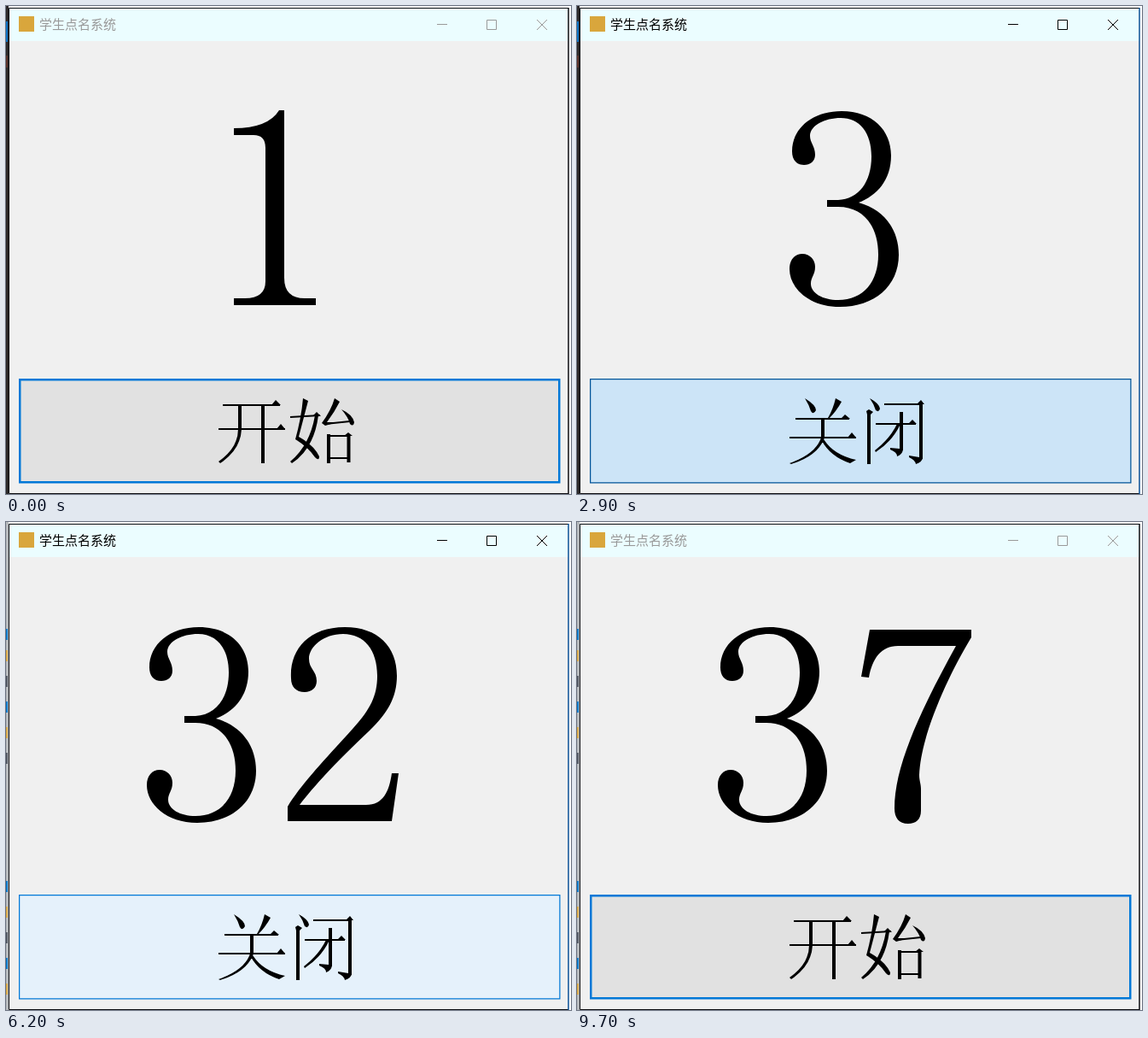
An HTML page that plays this animation: 662x571 px, repeating every 9900 ms.

```html
<!DOCTYPE html>
<html lang="zh-CN">
<head>
<meta charset="utf-8">
<title>学生点名系统</title>
<style>
  html, body { margin: 0; width: 100%; height: 100%; overflow: hidden; background: #fff; }
  svg { display: block; }
  #caption { font: 15px "Noto Sans CJK SC", "Noto Sans CJK", sans-serif; }
  .line { fill: none; }
  .thin { fill: none; stroke: #000; stroke-width: 2; }
  .thick { fill: none; stroke: #000; stroke-width: 4; }
</style>
</head>
<body>
<svg width="662" height="571" viewBox="0 0 662 571">
  <defs>
    <!-- Song-style numerals, drawn in a cell from x=230 to x=398 -->
    <path id="d1" d="M320 122H326V318Q326 342 350 342H363V350H267V342H280Q304 342 304 322V166Q304 151 290 151H267V143Q307 143 320 122Z"/>
    <path id="d2" d="M250 183C248 150 270 123 313 123C352 123 374 146 374 180C374 205 363 224 342 244C311 273 279 306 260 331H338C358 331 365 315 368 294H376L368 350H246V333C262 306 297 270 323 241C343 219 351 203 351 180C351 150 336 131 311 131C288 131 271 146 271 160C271 172 280 174 280 186C280 194 274 199 266 199C256 199 250 193 250 183Z"/>
    <path id="d3" d="M252 170C252 143 276 123 310 123C346 123 368 145 368 175C368 204 351 222 330 230C360 238 377 262 377 291C377 328 348 352 308 352C272 352 249 330 249 308C249 297 255 290 264 290C273 290 279 297 279 305C279 315 274 317 274 325C274 336 288 344 306 344C336 344 353 322 353 291C353 258 336 235 306 235H293V227H306C330 226 345 206 345 176C345 148 331 131 309 131C290 131 273 140 273 152C273 160 279 164 279 174C279 182 273 186 266 186C257 186 252 180 252 170Z"/>
    <path id="d4" fill-rule="evenodd" d="M334 123H344V275H378V284H344V325Q344 342 362 342H374V350H292V342H305Q322 342 322 325V284H241V275ZM322 149L251 275H322Z"/>
    <path id="d7" d="M259 126H378V135C352 178 319 248 317 296C317 303 319 306 319 312V338C319 348 313 353 304 353C293 353 288 346 288 335C288 290 312 232 360 145H292C272 145 262 160 258 182L249 181Z"/>
  </defs>

  <rect id="strip" width="3" height="571"/>
  <g id="specksA">
    <rect y="18" width="2" height="24" fill="#0a6fc2"/>
    <rect y="58" width="2" height="14" fill="#5a3028"/>
  </g>
  <g id="specksB"></g>

  <rect x="3" y="2" width="656" height="569" fill="#f0f0f0"/>
  <rect x="3" y="2" width="656" height="39" fill="#ebfdff"/>
  <path class="line" stroke="#0b0b0f" d="M659 2.5H3.5V570.5H659"/>
  <path id="edge" class="line" stroke-width="1.5" d="M659 2V571"/>
  <rect x="15" y="12" width="18" height="18" fill="#d9a63c"/>
  <text id="caption" x="39" y="27">学生点名系统</text>
  <path id="controls" class="line" d="M505 21.5H517M563.5 16.5H574.5V27.5H563.5ZM622 16L634 28M634 16L622 28"/>

  <g id="digits"></g>

  <rect id="button"/>
  <g id="start" role="img" aria-label="开始">
    <path class="thin" d="M254 467H321M249 495H327M333 481L368 479M374 489L403 486M378 503H402M378 529H402"/>
    <path class="thick" d="M301 467V535M378 501V535M401.5 503V534"/>
    <path d="M311 467L316 461L322 467ZM317 495L322 489L327 495ZM359 480L364 475L369 480ZM396 503L401 499L406 503Z
      M272 467H276V495Q275 519 251 535L249 533Q272 517 272 495Z
      M348 459L354 462L343 504Q361 514 367 527Q367 533 362 528Q354 516 339 507Q346 482 348 459Z
      M362 479H366Q361 518 335 535L333 533Q356 514 362 479Z
      M385 459L391 463Q385 475 376 487L388 487L374 491L370 488Q381 473 385 459Z
      M393 472Q406 478 408 487Q407 493 403 489Q401 481 393 472Z"/>
  </g>
  <g id="stop" role="img" aria-label="关闭">
    <path class="thin" d="M256 483H319M249 505H327M360 466H403M350 489H397"/>
    <path class="thick" d="M342 474V536M403 466V530M380 475V520"/>
    <path d="M309 483L314 478L320 483ZM317 505L322 499L327 505ZM398 466L403 461L407 466ZM388 489L393 484L398 489Z
      M267 459Q280 467 280 473Q277 479 274 474Q272 467 267 459Z
      M303 459L310 463Q304 474 295 483L294 482Q300 472 303 459Z
      M286 483H290V505Q283 526 251 536L249 535Q280 524 286 505Z
      M288 505Q299 525 327 531L320 535Q296 527 286 507Z
      M343 459Q354 465 355 471Q354 476 350 473Q348 466 343 459Z
      M339 474L342 472L347 475L344 478H340Z
      M405 529Q404 534 397 536Q396 531 389 528V526L401 528Z
      M382 519Q381 525 375 527Q375 522 367 519V517L378 518Z
      M375 489H379Q370 509 350 522L349 520Q367 506 375 489Z"/>
  </g>
</svg>
<script>
const LOOP = 9900, STEP = 100, CELL = 168;
const el = id => document.getElementById(id);

const rolls = [
  { from: 1600, values: [3, 1, 4, 2, 3, 1, 4, 2, 4, 2, 1, 1, 1, 3, 2, 1] },
  { from: 6000, values: [24, 13, 32, 4, 21, 14, 33, 2, 7, 23, 12, 31, 34, 17, 37] }
];
const buttonTimes = [
  [0, 'focus'], [700, 'hover'], [1400, 'press'], [1600, 'hover'],
  [2900, 'press'], [3100, 'hover'], [3600, 'focus'], [5400, 'hover'],
  [5800, 'press'], [6000, 'hover'], [7200, 'press'], [7400, 'hover'], [7800, 'focus']
];
const activeTimes = [[0, false], [1400, true], [4400, false], [5800, true], [9700, false]];
const runningTimes = [[0, false], [1600, true], [3100, false], [6000, true], [7400, false]];
const sceneTimes = [[0, 'A'], [4600, 'B']];

const looks = {
  focus: { fill: '#e1e1e1', stroke: '#0078d7', weight: 2.5 },
  hover: { fill: '#e5f1fb', stroke: '#0078d7', weight: 1.25 },
  press: { fill: '#cce4f7', stroke: '#005499', weight: 1.25 }
};

function set(node, attributes) {
  for (const name in attributes) node.setAttribute(name, attributes[name]);
}
const valueAt = (times, t) => times.filter(([start]) => start <= t).pop()[1];
const show = (id, visible) => set(el(id), { visibility: visible ? 'visible' : 'hidden' });

function numberAt(t) {
  const roll = rolls.filter(r => r.from <= t).pop();
  if (!roll) return 1;
  const index = Math.floor((t - roll.from) / STEP);
  return roll.values[Math.min(index, roll.values.length - 1)];
}

// A sliver of desktop icons shows beside the window.
el('specksB').innerHTML = [125, 150, 180, 210, 240, 270, 420, 450, 480, 510, 540].map((y, i) =>
  `<rect y="${y}" width="2" height="13" fill="${['#0878c8', '#d6a84a', '#555b66'][i % 3]}"/>`).join('');

let shownNumber;
function drawNumber(number) {
  if (number === shownNumber) return;
  shownNumber = number;
  const text = String(number);
  el('digits').innerHTML = [...text].map((digit, i) => {
    const x = CELL * (i - (text.length - 1) / 2);
    return `<use href="#d${digit}" x="${x}"/>`;
  }).join('');
  set(el('digits'), { role: 'img', 'aria-label': text });
}

function draw(t) {
  const active = valueAt(activeTimes, t);
  const running = valueAt(runningTimes, t);
  const scene = valueAt(sceneTimes, t);
  const { fill, stroke, weight } = looks[valueAt(buttonTimes, t)];
  const inset = weight / 2;

  set(el('strip'), { fill: scene === 'A' ? '#2b2829' : '#b4b7bb' });
  show('specksA', scene === 'A');
  show('specksB', scene === 'B');
  set(el('edge'), { stroke: active ? '#0a4f94' : '#0b0b0f' });
  set(el('caption'), { fill: active ? '#000' : '#999' });
  set(el('controls'), { stroke: active ? '#000' : '#999' });
  set(el('button'), {
    x: 15 + inset, y: 436 + inset, width: 634.5 - weight, height: 122.5 - weight,
    fill, stroke, 'stroke-width': weight
  });
  show('start', !running);
  show('stop', running);
  drawNumber(numberAt(t));
}

const began = performance.now();
function frame() {
  draw((performance.now() - began) % LOOP);
  requestAnimationFrame(frame);
}
frame();
</script>
</body>
</html>
```
